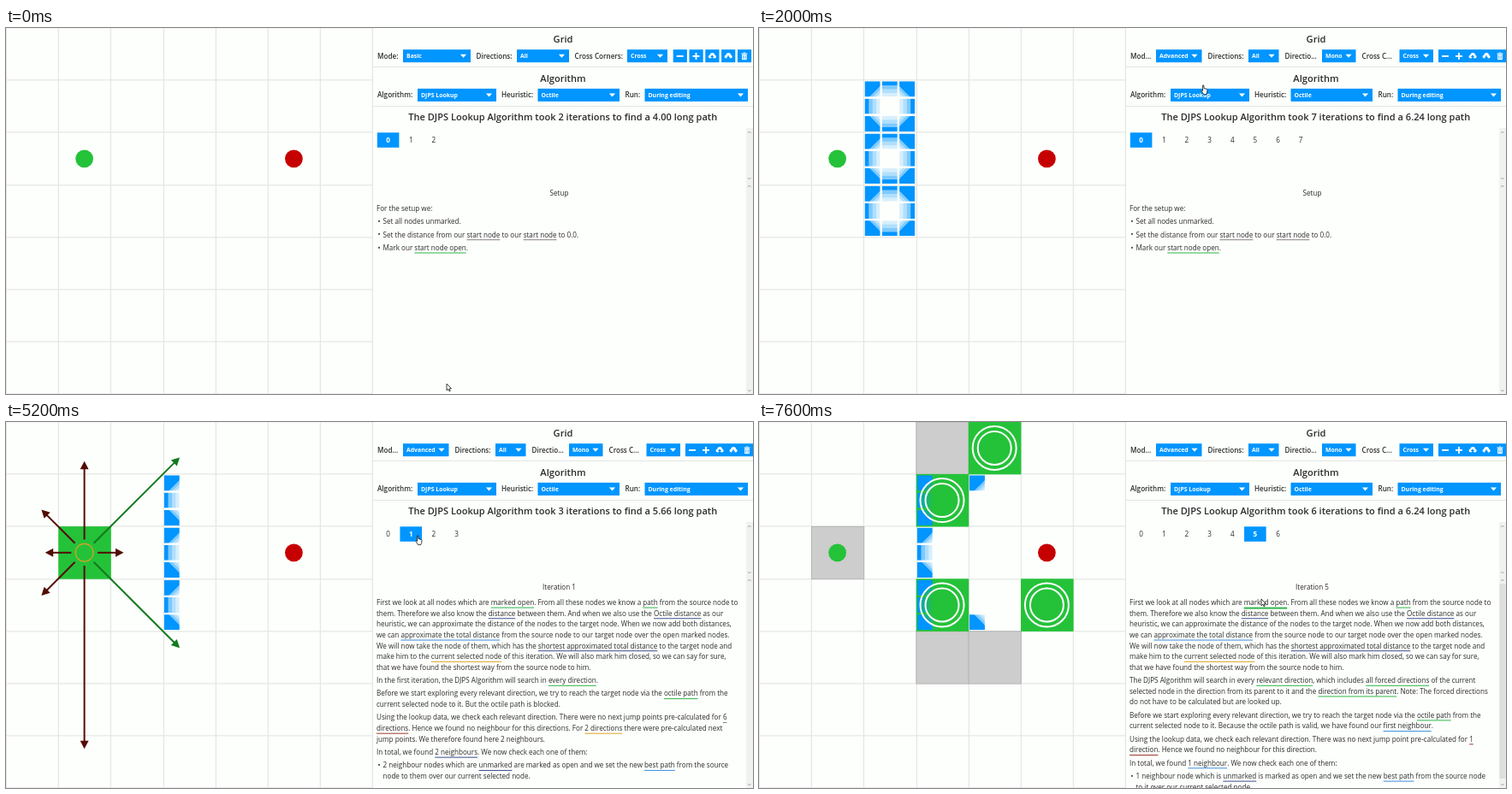
An HTML page with a canvas for the animation above (8 s loop, 873 px wide and 428 px high).

```html
<!DOCTYPE html>
<html lang="en">
<head>
<meta charset="utf-8">
<title>Pathfinding demo</title>
<style>
html, body { margin: 0; width: 100%; height: 100%; overflow: hidden; background: #fdfffc; }
canvas { display: block; }
</style>
</head>
<body>
<canvas id="stage" width="873" height="428"></canvas>
<script>
const g = document.getElementById('stage').getContext('2d');
const CELL = 61.2, STEP = 400, LOOP = 8000;
const BG = '#fdfffc', BLUE = '#0095ff', GREEN = '#24c239', RED = '#c60000', GRAY = '#cccdcc',
  LINE = '#e5e6e4', INK = '#2b2b2b', ORANGE = '#e0a020', NAVY = '#17398a', MAROON = '#520c04', DARK_GREEN = '#127a1e';
const MARKS = { g: '#2fb548', n: '#3b4f8f', b: '#3d8fe0', o: '#d9a521', m: '#a0392b', s: '#8a7f86' };
const START = [1, 2], GOAL = [5, 2];
// clockwise from the upper left corner
const DIRS = [[-1, -1], [0, -1], [1, -1], [1, 0], [1, 1], [0, 1], [-1, 1], [-1, 0]];
const ALL = '01234567', LEFT = '067', BOTTOM = '56';

/* ---------- copy ---------- */
const SETUP = [
  'For the setup we:',
  '*Set all nodes unmarked.',
  '*Set the distance from our {s start node} to our {s start node} to 0.0.',
  '*Mark our {g start node open}.'
];
const INTRO = `First we look at all nodes which are {g marked open}. From all these nodes we know a {g path} from the source node to
them. Therefore we also know the {n distance} between them. And when we also use the {n Octile distance} as our
heuristic, we can approximate the distance of the nodes to the target node. When we now add both distances,
we can {b approximate the total distance} from the source node to our target node over the open marked nodes.
We will now take the node of them, which has the {n shortest approximated total distance} to the target node and
make him to the {o current selected node} of this iteration. We will also mark him closed, so we can say for sure,
that we have found the shortest way from the source node to him.`;
const EXPLORE = 'Before we start exploring every relevant direction, we try to reach the target node via the {g octile path} from the\ncurrent selected node to it. ';
const LOOKUP = 'Using the lookup data, we check each relevant direction. There ';
const FIRST = [INTRO,
  'In the first iteration, the DJPS Algorithm will search in {g every direction}.',
  EXPLORE + 'But the octile path is blocked.',
  LOOKUP + 'were no next jump points pre-calculated for {s 6}\n{m directions}. Hence we found no neighbour for this directions. For {o 2 directions} there were pre-calculated next\njump points. We therefore found here 2 neighbours.',
  'In total, we found {n 2 neighbours}. We now check each one of them:',
  '*2 neighbour nodes which are {n unmarked} are marked as open and we set the new {b best path} from the source\nnode to them over our current selected node.'
];
const MIDDLE = [INTRO,
  'The DJPS Algorithm will search in every {g relevant direction}, which includes {g all forced directions} of the current\nselected node in the direction from its parent to it and the {g direction from its parent}. Note: The forced directions\ndo not have to be calculated but are looked up.',
  EXPLORE + 'Because the octile path is valid, we have found our {b first neighbour}.',
  LOOKUP + 'was no next jump point pre-calculated for {m 1}\n{m direction}. Hence we found no neighbour for this direction.',
  'In total, we found {b 1 neighbour}. We now check each one of them:',
  '*1 neighbour node which is {n unmarked} is marked as open and we set the new {b best path} from the source node\nto it over our current selected node.'
];
const LAST = [INTRO,
  'As our current selected node is our {m target node}, the algorithm can finish and we have found an {b optimal path}\nfrom the {g source node} to the {m target node}.'
];

/* ---------- timeline: each entry changes the one before ---------- */
const wall3 = (c, kind) => ({ [c + ',1']: kind, [c + ',2']: kind, [c + ',3']: kind });
const SIDE = wall3(3, LEFT), TOP = { ...SIDE, '4,1': '0' }, BOTH = { ...TOP, '4,3': '6' };
const changes = [
  { n: 2, len: '4.00', sel: 0, cur: ['arrow', 515, 416], walls: {}, closed: [], open: [] },
  { n: 3, cur: ['hand', 150, 92], walls: { '2,1': 'X' } },
  { n: 5, len: '4.83', cur: ['hand', 150, 150], walls: { '2,1': 'X', '2,2': 'X' } },
  { n: 7, len: '6.24', cur: ['hand', 150, 212], walls: wall3(2, 'X') },
  { cur: ['hand', 517, 67], menu: true },
  { menu: false, adv: true, walls: wall3(2, ALL) },
  { n: 5, len: '4.83', cur: ['hand', 127, 214], hov: [2, 3], walls: { '2,1': ALL, '2,2': ALL } },
  { n: 3, len: '4.00', cur: ['hand', 125, 153], hov: [2, 2], walls: { '2,1': ALL, '2,2': BOTTOM } },
  { cur: ['hand', 127, 92], hov: [2, 1], walls: { '2,1': BOTTOM } },
  { n: 2, cur: ['hand', 150, 75], walls: {} },
  { n: 3, cur: ['hand', 190, 118], hov: [3, 1], walls: { '3,1': LEFT } },
  { len: '4.83', cur: ['hand', 190, 165], hov: [3, 2], walls: { '3,1': LEFT, '3,2': LEFT } },
  { len: '5.66', cur: ['hand', 190, 228], hov: [3, 3], walls: SIDE },
  { sel: 1, hov: null, cur: ['hand', 479, 133], open: [START], at: START,
    rays: [[0, 1], [1, 2], [2, 2, 1], [3, 1], [4, 2, 1], [5, 4], [6, 1], [7, 1]] },
  { sel: 2, cur: ['hand', 506, 132], closed: [START], open: [[3, 0], [3, 4]], at: [3, 0],
    rays: [[4, 2, 1]], path: [START, [3, 0]] },
  { sel: 3, cur: ['hand', 532, 130], closed: [START, [3, 0]], open: [GOAL, [3, 4]], at: GOAL,
    rays: [], path: [START, [3, 0], GOAL] },
  { n: 4, sel: 4, cur: ['hand', 252, 72], hov: [4, 1], walls: TOP, closed: [START, [3, 0], [3, 4]],
    open: [[4, 0], [3, 1], GOAL], path: [START, [3, 4], GOAL] },
  { n: 6, sel: 6, len: '6.24', cur: ['hand', 252, 233], hov: [4, 3], walls: BOTH,
    closed: [START, [3, 0], [3, 4], [4, 4], [5, 3]], open: [[4, 0], [3, 1], [3, 3], GOAL],
    path: [START, [3, 4], [4, 4], [5, 3], GOAL] },
  { sel: 5, hov: null, cur: ['hand', 585, 131], closed: [START, [3, 0], [3, 4], [4, 4]],
    open: [[4, 0], [3, 1], [3, 3], [5, 3]], at: [5, 3], rays: [[0, 3], [1, 1, 1]],
    path: [START, [3, 4], [4, 4], [5, 3]] },
  { cur: ['arrow', 587, 207], rings: true, at: null, rays: [], path: null }
];
const states = [];
changes.forEach((c, i) => states.push({ ...states[i - 1], ...c }));

/* ---------- helpers ---------- */
const mid = ([c, r]) => [(c + .5) * CELL - .2, (r + .5) * CELL - .2];
function box(x, y, w, h, color) { g.fillStyle = color; g.fillRect(x, y, w, h); }
function text(s, x, y, size = 8.12, color = INK, weight = 400, align = 'left') {
  g.font = `${weight} ${size}px "Open Sans", "Noto Sans", sans-serif`;
  g.textAlign = align;
  g.fillStyle = color;
  g.fillText(s, x, y + size * .36);
}
function poly(points, color) {
  g.beginPath();
  points.forEach(([x, y]) => g.lineTo(x, y));
  g.closePath();
  g.fillStyle = color;
  g.fill();
}
function stroke(points, color, width) {
  g.beginPath();
  points.forEach(([x, y]) => g.lineTo(x, y));
  g.strokeStyle = color;
  g.lineWidth = width;
  g.stroke();
}
function circle(x, y, r, fill, edge, width) {
  g.beginPath();
  g.arc(x, y, r, 0, 7);
  if (fill) { g.fillStyle = fill; g.fill(); }
  if (edge) { g.strokeStyle = edge; g.lineWidth = width; g.stroke(); }
}
function head(x, y, dx, dy, size, color) {
  const l = Math.hypot(dx, dy), u = dx / l, v = dy / l, w = size * .52;
  const bx = x - u * size, by = y - v * size;
  poly([[x, y], [bx - v * w, by + u * w], [bx + v * w, by - u * w]], color);
}

/* ---------- grid ---------- */
function piece(c, r, d) {
  const [dx, dy] = DIRS[d], [mx, my] = mid([c, r]);
  g.save();
  g.translate(mx + dx * 20.3, my + dy * 20.3);
  if (dx && dy) g.scale(-dx, -dy);
  else g.rotate(Math.atan2(-dy, -dx));
  g.beginPath();
  g.rect(-9, -9, 18, 18);
  g.clip();
  g.fillStyle = BLUE;
  const diag = dx && dy;
  const cuts = diag ? [0, 24, 28, 32, 36] : [0, 5, 9.3, 13.7, 18];
  [1, .5, .3, .15].forEach((a, i) => {
    const p = cuts[i] - 9, q = cuts[i + 1] - 9;
    g.globalAlpha = a;
    if (diag) poly([[p, -9], [q, -9], [-9, q], [-9, p]], BLUE);
    else g.fillRect(p, -9, q - p, 18);
  });
  g.restore();
}
function drawHover(s) {
  const [c, r] = s.hov, [mx, my] = mid(s.hov);
  g.strokeStyle = '#8fcbfa';
  g.lineWidth = 1;
  g.strokeRect(c * CELL + .3, r * CELL + .3, CELL, CELL);
  DIRS.forEach(([dx, dy], d) => {
    const diag = dx && dy, a = diag ? 11 : 15.5, b = diag ? 50 : 46;
    const shut = (x, y, k) => (s.walls[x + ',' + y] || '').includes(k);
    const own = shut(c, r, d), other = shut(c + dx, r + dy, (d + 4) % 8);
    if (own && other) return;
    const p = [mx + dx * a, my + dy * a], q = [mx + dx * b, my + dy * b];
    stroke([p, q], '#e3e4e2', 2);
    if (own) head(q[0], q[1], dx, dy, 9, '#dcdddb');
    if (other) head(p[0], p[1], -dx, -dy, 9, '#dcdddb');
  });
}
function drawRay(at, [d, n, good]) {
  const [dx, dy] = DIRS[d], [mx, my] = mid(at), gap = dx && dy ? 11 : 15.3;
  const color = good ? DARK_GREEN : MAROON, far = n * CELL - gap;
  const tip = [mx + dx * far, my + dy * far];
  stroke([[mx + dx * gap, my + dy * gap], [tip[0] - dx * 5, tip[1] - dy * 5]], color, 2);
  head(...tip, dx, dy, 9.5, color);
}
function drawPath(nodes) {
  const pts = nodes.map(mid), last = pts.length - 1;
  const pull = (p, q) => {
    const dx = Math.sign(q[0] - p[0]), dy = Math.sign(q[1] - p[1]), k = dx && dy ? 11 : 15.3;
    return [p[0] + dx * k, p[1] + dy * k];
  };
  const dx = pts[last][0] - pts[last - 1][0], dy = pts[last][1] - pts[last - 1][1];
  const from = pull(pts[0], pts[1]), to = pull(pts[last], pts[last - 1]);
  g.setLineDash([8, 6]);
  stroke([from, ...pts.slice(1, last), to], NAVY, 2);
  g.setLineDash([]);
  head(...to, dx, dy, 10, NAVY);
}
function drawGrid(s) {
  g.save();
  g.beginPath();
  g.rect(0, 0, 429, 428);
  g.clip();
  for (let i = 0; i <= 7; i++) {
    const p = Math.min(Math.round(i * CELL), 428);
    box(p - .25, 0, 1.2, 428, LINE);
    box(0, p - .75, 428, 1.2, LINE);
  }
  const cell = ([c, r], color) => box(c * CELL, r * CELL - .3, CELL + .4, CELL + .4, color);
  s.closed.forEach(p => {
    cell(p, GRAY);
    g.strokeStyle = '#b5b6b5';
    g.lineWidth = 1;
    g.strokeRect(p[0] * CELL + .3, p[1] * CELL, CELL, CELL);
  });
  s.open.forEach(p => cell(p, GREEN));
  for (const key in s.walls) {
    const [c, r] = key.split(',').map(Number), kind = s.walls[key];
    if (kind === 'X') {
      cell([c, r], BLUE);
      if (r > 1) box(c * CELL, r * CELL - .4, CELL, .8, '#3ba9f8');
    } else [...kind].forEach(d => piece(c, r, +d));
  }
  if (s.hov) drawHover(s);
  circle(...mid(START), 10.4, GREEN);
  circle(...mid(GOAL), 10.4, RED);
  if (s.at) {
    circle(...mid(s.at), 10.4, null, ORANGE, 1.2);
    s.rays.forEach(ray => drawRay(s.at, ray));
  }
  if (s.path) drawPath(s.path);
  if (s.rings) s.open.forEach(p => [25.5, 19.5].forEach(r => circle(...mid(p), r, null, '#fff', 2)));
  g.restore();
}

/* ---------- panel ---------- */
function select(label, lx, value, x, right, y, up) {
  text(label, lx, y, 8.12, INK, 600);
  box(x, y - 7.5, right - x, 15, BLUE);
  text(value, x + 4, y, 6.9, '#fff', 700);
  const k = up ? -1 : 1, ax = right - 8.5;
  poly([[ax - 3.6, y - 2 * k], [ax + 3.6, y - 2 * k], [ax, y + 2 * k]], '#fff');
}
function icon(kind, x, y) {
  if (kind < 2) {
    box(x - 4, y - .9, 8, 1.8, '#fff');
    if (kind) box(x - .9, y - 4, 1.8, 8, '#fff');
  } else if (kind < 4) {
    circle(x - 2.3, y + .6, 2.1, '#fff');
    circle(x + .2, y - 1, 2.8, '#fff');
    circle(x + 2.6, y + .7, 2, '#fff');
    const k = kind === 2 ? -1 : 1;
    box(x - .8, y - .5, 1.6, 4, BLUE);
    poly([[x - 2.2, y + 1], [x + 2.2, y + 1], [x, y + 1 + 2.5 * k]], BLUE);
  } else {
    box(x - 3.5, y - 3.4, 7, 1.1, '#fff');
    box(x - 1.2, y - 4.3, 2.4, 1, '#fff');
    box(x - 2.8, y - 1.8, 5.6, 6, '#fff');
    [-1.3, 0, 1.3].forEach(d => box(x + d - .25, y - .8, .5, 4, BLUE));
  }
}
function drawToolbar(s) {
  text('Grid', 651, 13, 11.1, INK, 600, 'center');
  if (s.adv) {
    select('Mod...', 434, 'Advanced', 464, 517.5, 32.7);
    select('Directions:', 524.5, 'All', 572, 607.5, 32.7);
    select('Directio...', 614.5, 'Mono', 658, 697.5, 32.7);
    select('Cross C...', 704.5, 'Cross', 748.5, 788, 32.7);
  } else {
    select('Mode:', 434, 'Basic', 464, 543, 32.7, s.menu);
    select('Directions:', 549.5, 'All', 597, 658, 32.7);
    select('Cross Corners:', 664.5, 'Cross', 726, 773, 32.7);
  }
  for (let i = 0; i < 5; i++) {
    const x = s.adv ? 802 + i * 16 : 787.7 + i * 18.8;
    box(x - 8, 25.2, 16.2, 15, BLUE);
    icon(i, x, 32.9);
  }
  box(429, 45, 444, 1, LINE);
  text('Algorithm', 651, 59, 11.1, INK, 600, 'center');
  select('Algorithm:', 434, 'DJPS Lookup', 481, 573, 78.4);
  select('Heuristic:', 579, 'Octile', 621.5, 717, 78.4);
  select('Run:', 723.5, 'During editing', 746.5, 867, 78.4);
  box(429, 91, 444, 1, LINE);
}
function drawLine(s, x, y, thick) {
  s.split(/(\{.*?\})/).forEach(part => {
    const mark = part[0] === '{' && MARKS[part[1]];
    const run = mark ? part.slice(3, -1) : part;
    text(run, x, y);
    const w = g.measureText(run).width;
    if (mark) box(x, y + 5.6, w, thick && run === 'marked open' ? 2 : 1, mark);
    x += w;
  });
}
function drawCopy(s) {
  const paras = !s.sel ? SETUP : s.sel === s.n ? LAST : s.sel === 1 ? FIRST : MIDDLE;
  text(s.sel ? 'Iteration ' + s.sel : 'Setup', 646.5, 193.5, 8.12, INK, 400, 'center');
  let y = 211;
  paras.forEach(para => {
    const bullet = para[0] === '*';
    if (bullet) text('•', 434.5, y - .3);
    (bullet ? para.slice(1) : para).split('\n').forEach(line => {
      drawLine(line, bullet ? 440.5 : 433, y, s.rings);
      y += 12.65;
    });
    y += 2.65;
  });
}
function scrollbar(y, h, thumb) {
  box(865, y, 8, h, '#f1f2f0');
  if (thumb) box(865.5, y + 9, 7, h - 20, '#dededc');
  stroke([[867, y + 6], [868.8, y + 4], [870.6, y + 6]], '#a8a8a8', 1);
  stroke([[867, y + h - 5], [868.8, y + h - 3], [870.6, y + h - 5]], '#a8a8a8', 1);
}
function drawPanel(s) {
  box(428, 0, 1, 428, LINE);
  drawToolbar(s);
  text(`The DJPS Lookup Algorithm took ${s.n} iterations to find a ${s.len} long path`, 650.7, 104.3, 11.05, INK, 600, 'center');
  for (let i = 0; i <= s.n; i++) {
    const x = 446.6 + i * 26.65, on = i === s.sel;
    if (on) box(x - 12.8, 122.3, 25.6, 17.5, BLUE);
    text(i, x, 131.2, 8.12, on ? '#fff' : INK, on ? 700 : 400, 'center');
  }
  drawCopy(s);
  scrollbar(117, 63);
  scrollbar(180, 248, s.sel > 1 && s.sel < s.n);
}
function drawMenu() {
  poly([[474, 42.5], [479, 48.5], [469, 48.5]], BLUE);
  box(464, 48, 79.5, 29, '#fff');
  box(464.5, 48, 78.5, 28, BLUE);
  text('Basic', 468.5, 55.5, 6.9, '#fff', 700);
  text('Advanced', 468.5, 70, 6.9, '#fff', 700);
  g.beginPath();
  g.roundRect(254, 3, 177, 74, 2);
  g.fillStyle = '#c8a519';
  g.fill();
  poly([[431, 29.5], [434, 32.7], [431, 36]], '#c8a519');
  const note = (t, x, y, align) => text(t, x, y, 6.7, '#fff', 700, align);
  note('Select the mode of the grid', 342.5, 10.5, 'center');
  note('Basic', 274, 31, 'center');
  note('Advanced', 274, 60.5, 'center');
  ['Nodes can either be marked as', 'walkable or as not walkable.'].forEach((t, i) => note(t, 302, 26 + i * 10));
  ['For each direction a node can be', 'marked as enterable or as not', 'enterable.'].forEach((t, i) => note(t, 302, 50.5 + i * 9.9));
}
function drawCursor([kind, x, y]) {
  const shape = kind === 'hand'
    ? [[1.6, 0], [2.8, 0], [3, 3.6], [6.2, 4.4], [7, 5.4], [6.6, 8.4], [5.8, 10.6], [2.6, 10.6], [0, 6.4], [.6, 5.6], [1.6, 6.4]]
    : [[0, 0], [0, 7.8], [1.8, 6.2], [3, 8.8], [4.2, 8.3], [3.1, 5.8], [5.4, 5.6]];
  const pts = shape.map(([a, b]) => [x + a, y + b]);
  poly(pts, '#fff');
  stroke([...pts, pts[0]], '#111', .8);
}

function render(now) {
  const s = states[Math.floor((now % LOOP) / STEP)];
  box(0, 0, 873, 428, BG);
  drawGrid(s);
  drawPanel(s);
  if (s.menu) drawMenu();
  drawCursor(s.cur);
}
const begin = performance.now();
function tick() {
  render(performance.now() - begin);
  requestAnimationFrame(tick);
}
tick();
</script>
</body>
</html>
```
